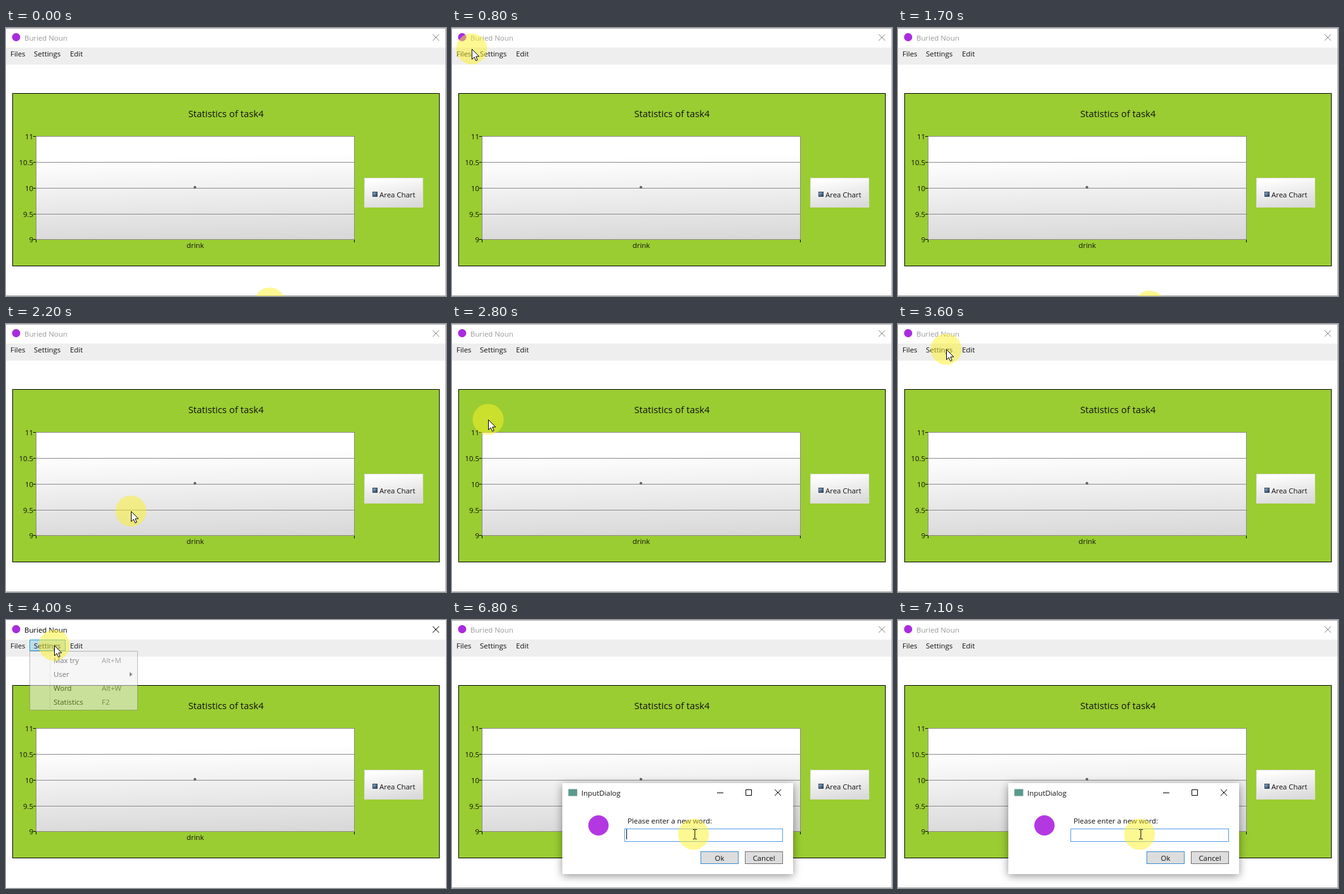
An HTML page for the animation above (8 s loop, 694 px wide and 424 px high).

```html
<!DOCTYPE html>
<html lang="en">
<head>
<meta charset="utf-8">
<title>Buried Noun</title>
<style>
html, body { margin: 0; width: 100%; height: 100%; overflow: hidden; background: #fff; }
svg { display: block; width: 694px; height: 424px; }
text { font: 11.4px "Open Sans", "Noto Sans", sans-serif; fill: #111; white-space: pre; }
.head { font-size: 14.8px; }
.mid { text-anchor: middle; }
.end { text-anchor: end; }
.line { fill: none; stroke: #000; }
.shadow { filter: drop-shadow(0 3px 7px rgba(0, 0, 0, .42)); }
</style>
</head>
<body>
<svg viewBox="0 0 694 424">
  <defs>
    <linearGradient id="plot" x1=".47" y1=".2" x2=".53" y2="1">
      <stop offset="0" stop-color="#fff"/><stop offset="1" stop-color="#d9d9d9"/>
    </linearGradient>
    <linearGradient id="key" x1=".35" y1="0" x2=".65" y2="1">
      <stop offset="0" stop-color="#fff"/><stop offset="1" stop-color="#dadada"/>
    </linearGradient>
    <linearGradient id="swatch" x1="0" y1="0" x2="1" y2="1">
      <stop offset="0" stop-color="#a3bccf"/><stop offset="1" stop-color="#183450"/>
    </linearGradient>
  </defs>

  <rect width="694" height="424" fill="#fff"/>
  <circle cx="16" cy="14.5" r="6.5" fill="#a92be0"/>
  <text id="title" x="29" y="20">Buried Noun</text>
  <path id="close" class="line" d="M673 10l10 10m0-10l-10 10"/>

  <rect y="31" width="694" height="27" fill="#eee"/>
  <rect id="hot" x="37.5" y="31.5" width="56" height="17" fill="#bddcec" stroke="#26a0da"/>
  <text x="7" y="45">Files</text>
  <text x="44" y="45">Settings</text>
  <text x="101" y="45">Edit</text>

  <rect x="10.5" y="103.5" width="673" height="273" fill="#9acd32" stroke="#000"/>
  <text class="head mid" x="347" y="141">Statistics of task4</text>
  <rect x="47.5" y="171.5" width="502" height="163" fill="url(#plot)" stroke="#8c8c8c"/>
  <g id="axis"></g>
  <path class="line" d="M47.5 335v4M549.5 335v4"/>
  <circle cx="298" cy="252" r="1.7" fill="#777" stroke="#444" stroke-width=".8"/>
  <text class="mid" x="298.5" y="348">drink</text>
  <rect x="565.5" y="237.5" width="92" height="46" fill="url(#key)" stroke="#ddd"/>
  <rect x="578.5" y="259.5" width="7" height="7" fill="url(#swatch)" stroke="#28405a"/>
  <text x="589" y="268">Area Chart</text>

  <path id="edge" class="line" d="M0 .5H693.5V423.5H0"/>

  <g id="menu">
    <rect x="37.5" y="49.5" width="170" height="93" fill="#f0f0f0" stroke="#888"/>
    <path class="line" stroke-opacity=".12" d="M69.5 51V141"/>
    <path d="M195 82.500l4.500 3.500l-4.500 3.500z" fill="#222"/>
  </g>

  <g id="dialog">
    <rect class="shadow" x="174" y="258" width="364" height="144" fill="#fff"/>
    <rect x="183.500" y="267.500" width="14" height="11" fill="#5c9a8c"/>
    <text x="204" y="278">InputDialog</text>
    <path class="line" d="M418 273.500h10M463.500 268.500h9v9h-9zM509 268l10 10m0-10l-10 10"/>
    <circle cx="231" cy="325" r="16" fill="#b338e2"/>
    <text x="277" y="322">Please enter a new word:</text>
    <rect x="272.500" y="330.500" width="249" height="20" fill="#fff" stroke="#569de5"/>
    <path id="caret" class="line" d="M275.500 331v16"/>
    <rect x="392.500" y="366.500" width="59" height="19" fill="#ddd" stroke="#3c8fd0"/>
    <text class="mid" x="422" y="381">Ok</text>
    <rect x="462.500" y="366.500" width="59" height="19" fill="#ddd" stroke="#707070"/>
    <text class="mid" x="492" y="381">Cancel</text>
  </g>

  <g id="mouse">
    <circle r="24.5" fill="#fdf228" fill-opacity=".5"/>
    <path id="arrow" d="M.5 .5V16.500L4.200 13L6.700 18.700L9.200 17.600L6.800 12H11.800Z" fill="#fff" stroke="#000"/>
    <path id="beam" class="line" d="M-1 -7.500h2.500m1 0h2.500M2 -7V7M-1 7.500h2.500m1 0h2.500"/>
  </g>
</svg>
<script>
const LOOP = 8000, STEP = 100;
const PRESS = 3900, OPEN = 4000, ASK = 6800, BLINK = 7100;
const $ = id => document.getElementById(id);

// time, x, y of the pointer
const path = [
  [0, 416, 435], [200, 520, 385], [300, 630, 270], [500, 420, 130],
  [700, 130, 60], [800, 31, 33], [900, 58, 61], [1100, 260, 130],
  [1300, 606, 230], [1500, 500, 390], [1700, 397, 440], [1800, 388, 442],
  [1900, 355, 420], [2200, 197, 296], [2400, 51, 169], [2700, 51, 169],
  [3100, 73, 96], [3300, 89, 35], [3600, 76, 40]
];

function add(parent, tag, attrs, label = '') {
  const el = document.createElementNS('http://www.w3.org/2000/svg', tag);
  for (const k in attrs) el.setAttribute(k, attrs[k]);
  el.textContent = label;
  parent.append(el);
}

for (let i = 0; i < 5; i++) {
  const y = [171.5, 212.5, 253.5, 294.5, 334.5][i];
  add($('axis'), 'path', { d: `M48 ${y}H549`, stroke: '#8c8c8c' });
  add($('axis'), 'path', { d: `M43 ${y}h4`, stroke: '#000' });
  add($('axis'), 'text', { x: 43, y: y + 4.5, class: 'end' }, 11 - i / 2);
}

[['Max try', 'Alt+M'], ['User', ''], ['Word', 'Alt+W'], ['Statistics', 'F2']].forEach(([name, keys], i) => {
  const y = 68 + 22 * i;
  add($('menu'), 'text', { x: 75, y }, name);
  add($('menu'), 'text', { x: 151, y, style: 'fill:#555' }, keys);
});

function pointer(t) {
  if (t >= ASK) return [381, 339];
  const n = path.findIndex(p => p[0] > t);
  if (n < 0) return path[path.length - 1].slice(1);
  const [t0, x0, y0] = path[n - 1], [t1, x1, y1] = path[n];
  const k = (t - t0) / (t1 - t0);
  return [Math.round(x0 + (x1 - x0) * k), Math.round(y0 + (y1 - y0) * k)];
}

const show = (id, on) => { $(id).style.display = on ? '' : 'none'; };

function draw() {
  const t = Math.floor(performance.now() % LOOP / STEP) * STEP;
  const active = t >= PRESS && t < ASK, asking = t >= ASK;
  $('title').style.fill = active ? '#000' : '#999';
  $('close').style.stroke = active ? '#000' : '#888';
  $('edge').style.stroke = active ? '#f4f4f4' : '#aaa';
  show('hot', active);
  show('menu', active);
  $('menu').style.opacity = t < OPEN ? .2 : .55;
  show('dialog', asking);
  show('caret', t < BLINK);
  show('arrow', !asking);
  show('beam', asking);
  $('mouse').setAttribute('transform', `translate(${pointer(t)})`);
  requestAnimationFrame(draw);
}
draw();
</script>
</body>
</html>
```
